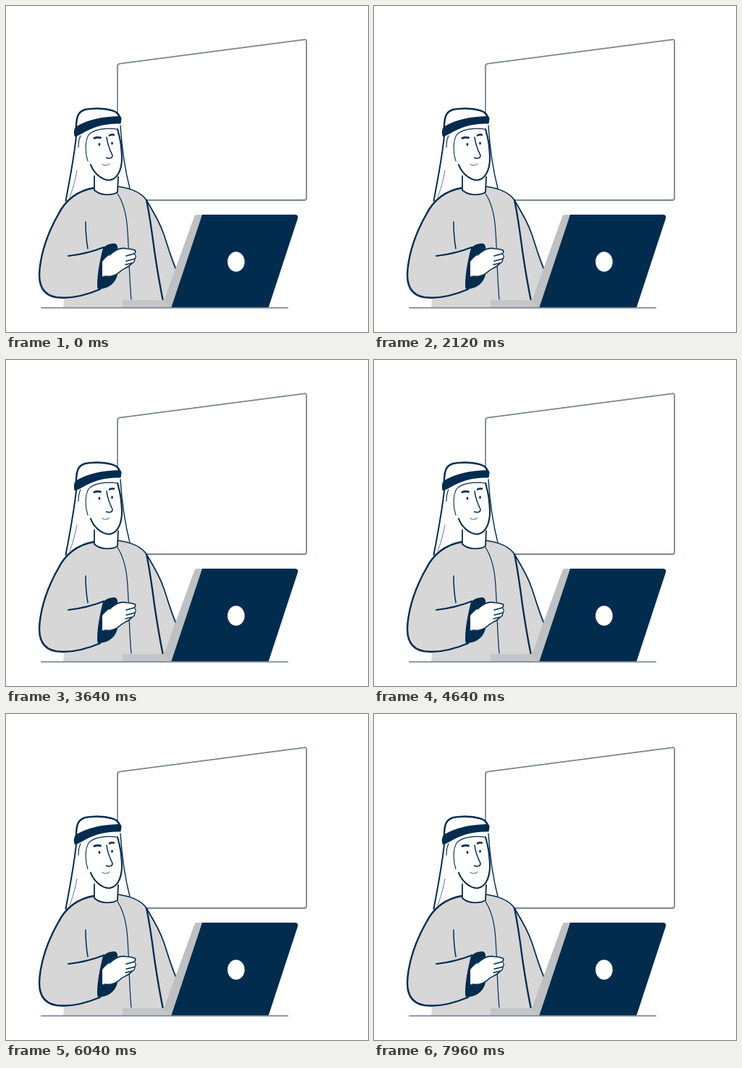
An HTML page with a canvas that plays this animation: 500 by 450 pixels, repeating every 8 s.

```html
<!DOCTYPE html>
<html lang="en">
<head>
<meta charset="utf-8">
<title>Presenter at a laptop</title>
<style>
  html, body { margin: 0; width: 100%; height: 100%; overflow: hidden; background: #fff; }
  canvas { display: block; width: 500px; height: 450px; }
</style>
</head>
<body>
<canvas id="stage" width="500" height="450"></canvas>
<script>
const ctx = document.getElementById('stage').getContext('2d');
const NAVY = '#012c4d', SLATE = '#7a8693', GREY = '#d7d7d8', EDGE = '#bfc0c2', WHITE = '#fff';

function fill(path, color) {
  ctx.fillStyle = color;
  ctx.fill(new Path2D(path));
}

function line(path, width = 1.6, color = NAVY) {
  ctx.strokeStyle = color;
  ctx.lineWidth = width;
  ctx.stroke(new Path2D(path));
}

function oval(x, y, rx, ry, color) {
  ctx.fillStyle = color;
  ctx.beginPath();
  ctx.ellipse(x, y, rx, ry, 0, 0, Math.PI * 2);
  ctx.fill();
}

function drawBoard() {
  line('M157 79.6L412 46.3Q415 46 415 49V265Q415 268 412 268H157Q154 268 154 265V83Q154 80 157 79.6Z', 1.8, SLATE);
}

function drawScarf() {
  fill('M96 178C95 152 100 146 109 143C122 140 141 141 151 146Q156 149 158 160C160 195 164 225 171 252L155 262H120L82 270C87 240 93 212 96 178Z', WHITE);
  line('M97 168C97 152 100 146 109 143C122 140.5 141 141 151 146Q155 148 157 153', 2.4);
  line('M97 180C93.5 212 88 240 82.5 269', 2);
  line('M103 179C101 183 100 188 100 195', 1.1);
  line('M98 227C96 240 92 253 88 264', 1.1, SLATE);
  line('M158 165C160 195 164 225 171 252', 1.4);
}

function drawRobe() {
  fill('M122 251C98 255 82 268 72 288C59 311 49 339 46 363C44 386 51 399 69 402L80 404L79 417H229L237 364C224 331 209 292 194 268C184 257 169 252 154 249Z', GREY);
  line('M122 251C98 255 82 268 72 288C59 311 49 339 46.5 363C44 386 51 399 69 402C90 405 111 399 130 391', 2.4);
  line('M154 249C175 252 188 259 194 268C205 287 213 300 219 318C224 334 229 351 235 364', 1.7);
  line('M194 268C198 287 202 315 205 338C209 365 213 388 216.5 405', 2.3);
  line('M154 259C162 271 166 288 167.5 305C170 335 170 375 173 405', 1.2);
  line('M110 298C110 313 111 324 113 335', 1.5);
  line('M86 345C104 343 120 339 135 333', 1.9);
}

function drawHead() {
  fill('M122 230V253C129 262 146 262 154 257L155 234Z', WHITE);
  line('M122 235V254C130 262 146 262 154 257L155 236', 1.8);
  fill('M114 178C122 170 140 168 154 170L159 194C162 218 157 237 142 240C127 239 115 223 112 211C109 198 110 186 114 178Z', WHITE);
  line('M154 170C141 168 122 169 114 178C109 187 109 202 113 214', 1.1);
  line('M154 170C156 177 159 189 159.5 200C162 222 156 238 143 240.5C130 240 120 228 117 219', 2.1);

  line('M122 182.4Q126 180.6 130.5 181.8', 2.8);
  line('M143 178.6Q146 177 148.8 177.8', 2.6);
  oval(129, 191, 1.4, 2, NAVY);
  oval(146.5, 189.5, 1.3, 2, NAVY);
  line('M139 181C140 190 144 200 147 206Q147 212 138.5 209.5', 1.5);
  line('M133 218.5Q137.5 222 143 218', 1.2, SLATE);

  fill('M95 180.5C93 175 94 170 96 167C112 157 133 152.5 156 152Q159.5 152 159.5 156L158.5 162.5C138 161.5 120 167 106 175.5Q100 179 95 180.5Z', NAVY);
}

function drawHand() {
  fill('M134 334C139 329 146 327 151 328Q155 330 154 337L154 371C151 382 143 390 128 391Q126 391 126 386C126 368 130 350 134 334Z', NAVY);
  fill('M133 353C139 345 148 339 155 336C163 333 169 334 173 336Q180 335 179 341Q181 344 179 349Q179 354 174 355C170 361 162 362 157 367C151 373 141 375 133 373Z', WHITE);
  line('M143 344C150 337 159 333 167 335Q172 335 178 337Q180 340 177 342L166 345', 1.6);
  line('M177 342Q181 345 178 349L166 352', 1.3);
  line('M178 349Q178 354 174 355L165 357', 1.3);
  line('M174 355C170 361 162 362 157 367C151 373 142 374 136 373', 1.5);
}

function drawLaptop() {
  fill('M161 406H234V417H161Z', '#c5c6c7');
  fill('M264 288H274L234 417H228L218 407L260 291Q261 288 264 288Z', EDGE);
  fill('M271 288H399Q404 288 403 293L363 415Q362.4 417 360 417H228Z', NAVY);
  oval(317.8, 353, 11.8, 13.8, WHITE);
  line('M49 416.7H389', 1.8, SLATE);
}

const layers = [drawBoard, drawScarf, drawRobe, drawHead, drawHand, drawLaptop];

// The scene holds its pose for the whole loop.
function render() {
  ctx.fillStyle = WHITE;
  ctx.fillRect(0, 0, 500, 450);
  ctx.lineCap = ctx.lineJoin = 'round';
  layers.forEach(draw => draw());
  requestAnimationFrame(render);
}
render();
</script>
</body>
</html>
```
